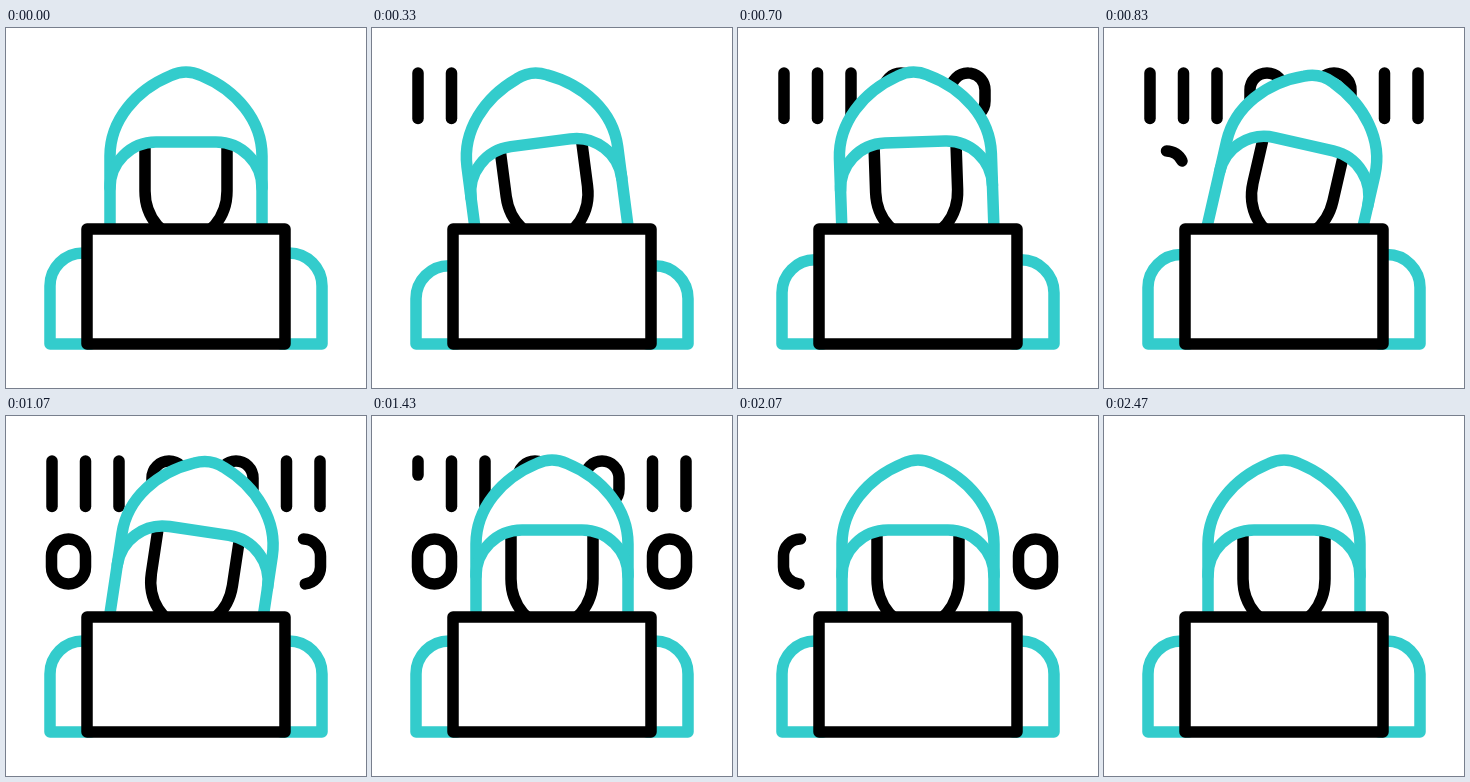
An HTML page that plays this animation: 360 by 360 pixels, repeating every 2500 ms.

```html
<!DOCTYPE html>
<html lang="en">
<head>
<meta charset="utf-8">
<title>Hooded figure at a laptop</title>
<style>
  html, body { margin: 0; width: 100%; height: 100%; overflow: hidden; background: #fff; }
  svg { display: block; width: 100%; height: 100%; }
  path, rect { fill: none; stroke: #000; stroke-width: 11.5; stroke-linecap: round; stroke-linejoin: round; }
  .teal { stroke: #33cccc; }
  .solid { fill: #fff; }
</style>
</head>
<body>
<svg viewBox="0 0 360 360">
  <g id="digits"></g>
  <path class="teal" id="left"/>
  <path class="teal" id="right"/>
  <g id="head">
    <path class="teal solid" d="M104 235V128C104 92 130 62 165 47.500Q180 40.500 195 47.500C230 62 256 92 256 128V235"/>
    <path d="M139 116V163A41 48 0 0 0 221 163V116"/>
    <path class="teal" d="M104 160A46 46 0 0 1 150 114H210A46 46 0 0 1 256 160"/>
  </g>
  <rect class="solid" x="81" y="201" width="198" height="115"/>
</svg>
<script>
const LOOP = 2500;
const $ = id => document.getElementById(id);

const bar = x => `M${x} 90.500V45`;

// A zero starting at its top; sweep 1 runs clockwise, 0 the other way.
function zero(x, y, sweep) {
  const r = 17, side = sweep ? r : -r;
  const arc = (px, py) => `A${r} ${r} 0 0 ${sweep} ${px} ${py}`;
  return `M${x} ${y}` + arc(x + side, y + r) + `v11` + arc(x, y + 45) +
    arc(x - side, y + 28) + `v-11` + arc(x, y);
}

const shapes = [
  bar(46), bar(79.5), bar(113), zero(163, 45, 0), zero(230, 45, 0),
  bar(280.5), bar(314), zero(62.5, 123, 1), zero(297.5, 123, 1)
];

let total = 0;
const digits = shapes.map(d => {
  const el = document.createElementNS('http://www.w3.org/2000/svg', 'path');
  el.setAttribute('d', d);
  $('digits').append(el);
  const start = total, len = el.getTotalLength();
  total += len;
  return { el, start, len };
});

const clamp = (v, lo, hi) => Math.min(hi, Math.max(lo, v));

function ease(t, from, to) {
  const p = clamp((t - from) / (to - from), 0, 1);
  return p * p * (3 - 2 * p);
}

// Eased value through [time, value] keys.
function track(t, keys) {
  let v = keys[0][1];
  for (let i = 1; i < keys.length; i++) {
    v += (keys[i][1] - keys[i - 1][1]) * ease(t, keys[i - 1][0], keys[i][0]);
  }
  return v;
}

const tilt = [[65, 0], [570, -13.7], [860, 13.7], [1365, 0]];
const drop = [[65, 0], [430, 15.5], [930, 0]];

function shoulder(x, dir, y) {
  const edge = x + 33 * dir;
  return `M${edge + 8 * dir} ${y}H${edge}A33 33 0 0 ${dir > 0 ? 0 : 1} ${x} ${y + 33}V316H${edge + 8 * dir}`;
}

function draw(t) {
  $('head').setAttribute('transform', `rotate(${track(t, tilt)} 180 203)`);
  const y = 225 + track(t, drop);
  $('left').setAttribute('d', shoulder(44, 1, y));
  $('right').setAttribute('d', shoulder(316, -1, y));

  // One trim window runs through all digits in sequence.
  const head = total * ease(t, 60, 1300);
  const tail = total * ease(t, 1285, 2463);
  for (const { el, start, len } of digits) {
    const a = clamp(tail - start, 0, len), b = clamp(head - start, 0, len);
    const shown = b - a > 0.01;
    el.style.display = shown ? '' : 'none';
    if (!shown) continue;
    const whole = b - a > len - 0.01;
    el.style.strokeDasharray = whole ? 'none' : `${b - a} 9999`;
    el.style.strokeDashoffset = whole ? 0 : -a;
  }
}

const begin = performance.now();
function tick() {
  draw((performance.now() - begin) % LOOP);
  requestAnimationFrame(tick);
}
tick();
</script>
</body>
</html>
```
